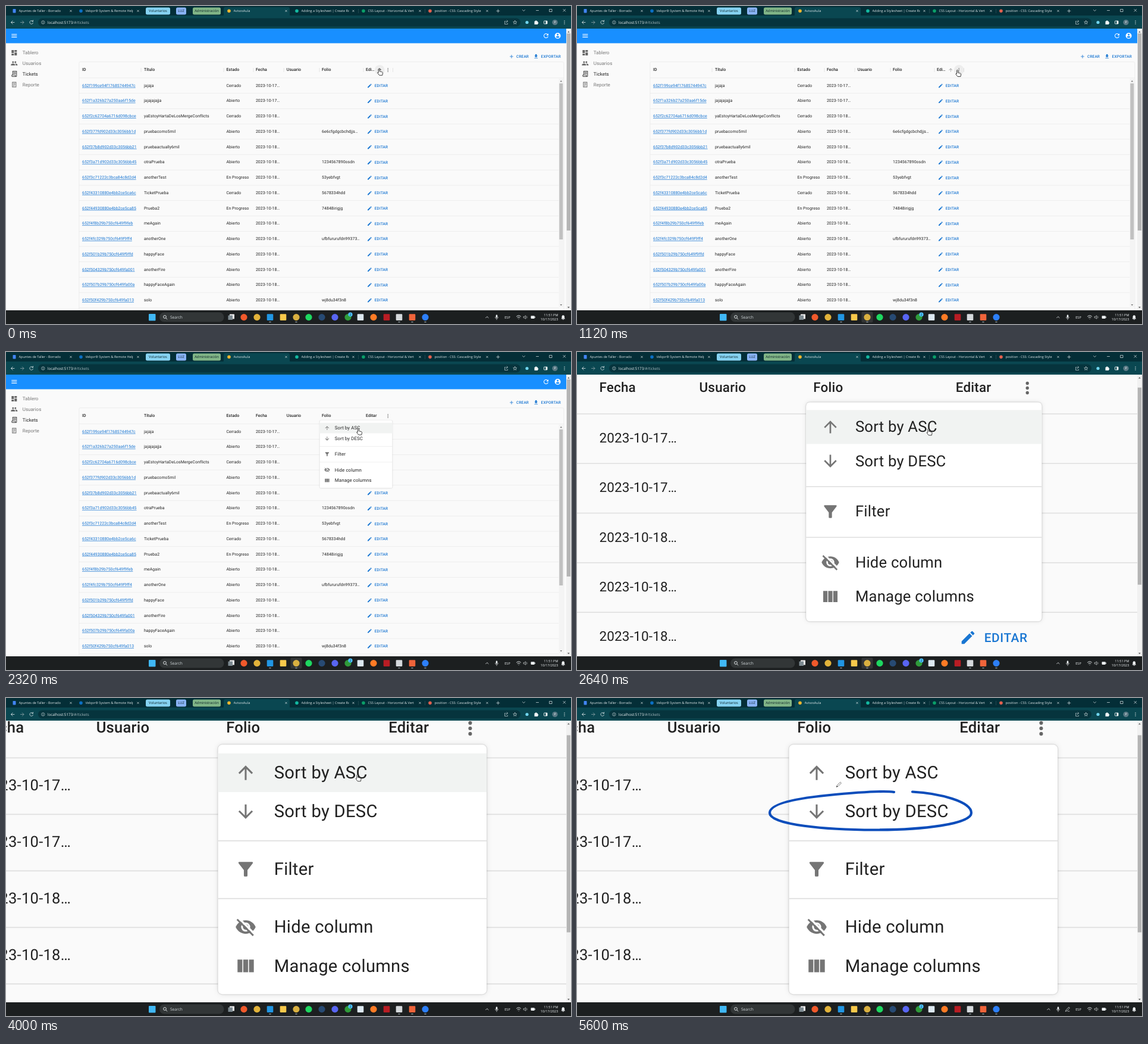
Animation, 950 px wide and 534 px high, one loop 5.68 s. Source, as an HTML page:

```html
<!DOCTYPE html>
<html lang="es">
<head>
<meta charset="utf-8">
<title>Tickets</title>
<style>
  html, body { margin: 0; width: 100%; height: 100%; overflow: hidden; background: #fafafa; }
  svg { display: block; }
  #stage { position: absolute; left: 0; top: 0; }
  text { text-rendering: geometricPrecision; white-space: pre; }
  .app { font-family: Roboto, Arial, sans-serif; }
  .ui { font-family: "Open Sans", "Noto Sans", sans-serif; }
  #menu .paper { filter: drop-shadow(0 .5px .35px rgba(0,0,0,.26)) drop-shadow(0 .5px 1.2px rgba(0,0,0,.1)); }
</style>
</head>
<body>
<svg id="stage" width="950" height="534" viewBox="0 0 950 534"></svg>
<script>
const LOOP = 5680;
const BLUE = '#1976d2', INK = '#212121', GREY = '#757575', LINE = '#e0e0e0';

const ICON = {
  menu: 'M3 18h18v-2H3zm0-5h18v-2H3zm0-7v2h18V6z',
  refresh: 'M17.65 6.35C16.2 4.9 14.21 4 12 4c-4.42 0-8 3.58-8 8s3.58 8 8 8c3.73 0 6.84-2.55 7.73-6h-2.08c-.82 2.33-3.04 4-5.65 4-3.31 0-6-2.69-6-6s2.69-6 6-6c1.66 0 3.14.69 4.22 1.78L13 11h7V4z',
  account: 'M12 2a10 10 0 1 0 0 20 10 10 0 0 0 0-20zm0 3a3 3 0 1 1 0 6 3 3 0 0 1 0-6zm0 14.2c-2.5 0-4.7-1.3-6-3.2 0-2 4-3.1 6-3.1s6 1.1 6 3.1c-1.3 1.9-3.5 3.2-6 3.2z',
  board: 'M3 13h8V3H3zm0 8h8v-6H3zm10 0h8V11h-8zm0-18v6h8V3z',
  people: 'M16 11a3 3 0 1 0 0-6 3 3 0 0 0 0 6zm-8 0a3 3 0 1 0 0-6 3 3 0 0 0 0 6zm0 2c-2.3 0-7 1.2-7 3.5V19h14v-2.5C15 14.2 10.3 13 8 13zm8 0-1 .1c1.2.8 2 1.9 2 3.4V19h6v-2.5c0-2.3-4.7-3.5-7-3.5z',
  receipt: 'M6 2v13H3v4c0 1.7 1.3 3 3 3h12c1.7 0 3-1.3 3-3V2zm2 2h11v15a1 1 0 0 1-2 0v-4H8zm1 2v2h9V6zm0 4v2h9v-2zM5 17h10v3H6a1 1 0 0 1-1-1z',
  report: 'M5 3h14v18H5zm2 2v14h10V5zm2 2h6v2H9zm0 4h6v2H9zm0 4h4v2H9z',
  edit: 'M3 17.25V21h3.75L17.81 9.94l-3.75-3.75zM20.71 7.04a1 1 0 0 0 0-1.41l-2.34-2.34a1 1 0 0 0-1.41 0l-1.83 1.83 3.75 3.75z',
  plus: 'M19 13h-6v6h-2v-6H5v-2h6V5h2v6h6z',
  save: 'M5 20h14v-2H5zM19 9h-4V3H9v6H5l7 7z',
  up: 'M4 12l1.41 1.41L11 7.83V20h2V7.83l5.58 5.59L20 12l-8-8z',
  down: 'M20 12l-1.41-1.41L13 16.17V4h-2v12.17l-5.58-5.59L4 12l8 8z',
  filter: 'M4.25 5.61 10 13v6q0 1 1 1h2q1 0 1-1v-6l5.74-7.39Q20.5 4 18.95 4H5.04Q3.5 4 4.25 5.61z',
  columns: 'M14.67 5v14H9.33V5zm1 14H21V5h-5.33zm-7.34 0V5H3v14z',
  dots: [6, 12, 18].map(y => `M10 ${y}a2 2 0 1 0 4 0 2 2 0 1 0-4 0z`).join('')
};

const text = (x, y, size, str, fill = INK, extra = '') =>
  `<text x="${x}" y="${y + size * .355}" font-size="${size}" fill="${fill}" ${extra}>${str.replace(/&/g, '&amp;')}</text>`;
const rect = (x, y, w, h, fill, r = 0, extra = '') =>
  `<rect x="${x}" y="${y}" width="${w}" height="${h}" rx="${r}" fill="${fill}" ${extra}/>`;
const dot = (x, y, r, fill, extra = '') => `<circle cx="${x}" cy="${y}" r="${r}" fill="${fill}" ${extra}/>`;
const at = (x, y, size, body) =>
  `<g transform="translate(${x - size / 2} ${y - size / 2}) scale(${size / 24})">${body}</g>`;
const icon = (name, x, y, size, fill) => at(x, y, size, `<path d="${ICON[name]}" fill="${fill}"/>`);
const stroke = (d, color, w = .8) =>
  `<path d="${d}" fill="none" stroke="${color}" stroke-width="${w}" stroke-linecap="round" stroke-linejoin="round"/>`;
const cross = (x, y, r, color) => stroke(`M${x - r} ${y - r}l${2 * r} ${2 * r}m0 ${-2 * r}l${-2 * r} ${2 * r}`, color, .7);

// Table
const COLS = [128, 231.9, 370.4, 419.9, 471.8, 531, 605];
const HEADS = ['ID', 'Título', 'Estado', 'Fecha', 'Usuario', 'Folio'];
const ROW = 25.73, TOP = 120.9;
const ROWS = `652f199ce94f17685744947c jajaja C
652f1a326b27a250aa6f15de jajajajajja A
652f2c62704a6716d098cbce yaEstoyHartaDeLosMergeConflicts C
652f377fd902d33c3056bb1d pruebacomo5mil A 6e6cfgdgcbchdjjs…
652f37b8d902d33c3056bb21 pruebaactually6mil A
652f3a71d902d33c3056bb45 otraPrueba A 1234567890osdn
652f3c71222c3bca84c8d2d4 anotherTest P 53yebfvgt
652f43310880e4bb2ce5ca6c TicketPrueba C 5678334hdd
652f44930880e4bb2ce5ca85 Prueba2 P 74848irigjg
652f4f8b29b750cf649f9feb meAgain A
652f4fc329b750cf649f9ff4 anotherOne A ufbfururufdn99373…
652f501b29b750cf649f9ffd happyFace A
652f504329b750cf649fa001 anotherFire A
652f507b29b750cf649fa00a happyFaceAgain A
652f50f429b750cf649fa013 solo A wj8du34f3n8`.split('\n').map(r => r.split(' '));
const STATE = { A: 'Abierto', C: 'Cerrado', P: 'En Progreso' };
const GAP = 'letter-spacing=".07"', BOLD = 'font-weight="500" letter-spacing=".07"', BTN = 'font-weight="500" letter-spacing=".18"';

function tableRow([id, title, state, folio = ''], i) {
  const y = 133.3 + i * ROW;
  const cells = [id, title, STATE[state], i < 2 ? '2023-10-17…' : '2023-10-18…', '', folio];
  return cells.map((c, k) => c && text(COLS[k], y, 6.93, c, k ? INK : BLUE, k ? GAP : 'text-decoration="underline"')).join('') +
    icon('edit', 611.4, y + .7, 8.9, BLUE) + text(619.8, y + .6, 6.44, 'EDITAR', BLUE, BTN) +
    rect(123, TOP + (i + 1) * ROW - .25, 806.5, .5, LINE);
}

function page() {
  const nav = [['board', 'Tablero', 78.4], ['people', 'Usuarios', 96.3], ['receipt', 'Tickets', 114.1], ['report', 'Reporte', 132]];
  const seps = [227, 366, 416, 467, 527, 601, 650.5];
  return rect(-10, 30, 960, 490, '#fafafa') +
    rect(0, 37, 942, 25.5, '#188fff') +
    icon('menu', 13.8, 50, 12, '#fff') + icon('refresh', 908, 50, 12, '#fff') + icon('account', 927.6, 50, 12, '#fff') +
    nav.map(([ic, label, y]) => {
      const on = label === 'Tickets';
      return icon(ic, 13.8, y, 12, on ? '#444' : '#666') + text(27.7, y, 7.92, label, on ? INK : '#757575', GAP);
    }).join('') +
    icon('plus', 850, 84.8, 9.9, BLUE) + text(858, 85, 6.44, 'CREAR', BLUE, BTN) +
    icon('save', 891.2, 84.8, 9.9, BLUE) + text(899.6, 85, 6.44, 'EXPORTAR', BLUE, BTN) +
    rect(122.8, 93.8, 815, 425, 'none', 2, `stroke="${LINE}" stroke-width=".5"`) +
    HEADS.map((h, i) => text(COLS[i], 107, 6.93, h, INK, BOLD)).join('') +
    rect(123, TOP - .25, 815, .5, LINE) +
    ROWS.map(tableRow).join('') +
    rect(929.5, 122, 8, 384, '#f4f4f4') + rect(930.3, 130, 6, 262, '#c1c1c1') +
    '<path d="M931.5 127.3l1.8-2.3 1.8 2.3zM931.5 501l1.8 2.3 1.8-2.3z" fill="#777"/>' +
    `<g id="hover">${seps.map(x => rect(x - .25, 104, .5, 7, '#cfcfcf')).join('')}
      <circle id="halo" cy="107.5" r="8.4" fill="#000" opacity=".05"/>
      ${text(COLS[6], 107, 6.93, 'Edi…', INK, BOLD)}
      <g id="sort">${icon('up', 628.3, 107.5, 8.9, '#333')}</g></g>
    <g id="calm">${text(COLS[6], 107, 6.93, 'Editar', INK, BOLD)}</g>` +
    icon('dots', 642.2, 107.5, 9.9, '#666') +
    `<g id="menu">${popup()}</g>`;
}

function popup() {
  const items = [['up', 'Sort by ASC', 127.5], ['down', 'Sort by DESC', 145.2], ['filter', 'Filter', 171.4], ['', 'Hide column', 197.7], ['columns', 'Manage columns', 215.4]];
  const eye = `<path d="M1 12c1.7-4.4 6-7.5 11-7.5s9.3 3.1 11 7.5c-1.7 4.4-6 7.5-11 7.5S2.7 16.4 1 12z" fill="${GREY}"/>` +
    dot(12, 12, 5, '#fff') + dot(12, 12, 3, GREY) +
    `<path d="M4 1.8L22 19.8" stroke="#fff" stroke-width="2.2"/><path d="M2.6 3.6L20.4 21.4" stroke="${GREY}" stroke-width="1.9"/>`;
  return rect(527.3, 114.9, 122.4, 113.6, '#fff', 2, 'class="paper"') +
    rect(527.3, 118.9, 122.4, 17.6, '#f1f3f2', 0, 'id="item"') +
    [158.4, 184.7].map(y => rect(527.3, y, 122.4, .5, LINE)).join('') +
    items.map(([ic, label, y]) =>
      (ic ? icon(ic, 539.9, y + .2, 9.9, GREY) : at(539.9, y + .2, 9.9, eye)) +
      text(552.85, y, 7.92, label, INK, 'letter-spacing=".074"')).join('');
}

// Browser frame
function browser() {
  const pale = '#dfe8ea', dim = '#8fa5aa';
  const tabs = [
    [14, 'Apuntes de Taller - Borrado', '#4285f4', 109], [126, 'Velqor® System & Remote Help', '#0b6fc4', 222],
    [375, 'AvisosAula', '#f2b72e', 471], [489, 'Adding a Stylesheet | Create Re', '#13b8a0', 584],
    [601, 'CSS Layout - Horizontal & Vert', '#0a9e68', 696], [713, 'position - CSS: Cascading Style', '#e0604f', 809]];
  const pills = [[235, 41, 'Voluntarios', '#86d3f2'], [286, 17, 'LUZ', '#8ab4f8'], [314, 47, 'Administración', '#81b587']];
  return rect(0, 0, 950, 17, '#042e37') + rect(0, 16, 950, 22, '#0a4751') +
    '<path d="M363 17q3 0 3-3V5q0-3 3-3h105q3 0 3 3v9q0 3 3 3z" fill="#0a4751"/>' +
    tabs.map(([x, name, color, end]) =>
      (x === 14 ? rect(11.5, 5, 5, 6.5, color, .8) : dot(x, 8.2, 2.8, color)) +
      `<svg x="${x + 7.5}" y="0" width="80" height="17">${text(0, 8.3, 5.55, name, pale)}</svg>` + cross(end, 8.3, 1.3, pale)).join('') +
    pills.map(([x, w, name, color]) => rect(x, 2.5, w, 12, color, 2.5) + text(x + w / 2, 8.4, 5.8, name, '#0b2328', 'text-anchor="middle"')).join('') +
    [592.5, 704.5].map(x => rect(x, 5, .5, 7, '#416068')).join('') +
    stroke('M824.8 8.3h5M827.3 5.8v5M868.5 6.5l2 2 2-2M891.5 7.5h4M914 5.5h4v4h-4z', pale, .7) + cross(938.8, 7.3, 1.9, pale) +
    stroke('M14 27.5h-5.5m2.6-2.6l-2.6 2.6 2.6 2.6', pale) + stroke('M24.5 27.5h5.5m-2.6-2.6l2.6 2.6-2.6 2.6', dim) +
    stroke('M45 25.5a2.9 2.9 0 1 0 .5 3M45.5 24v2h-2', pale) +
    rect(54, 20.5, 811, 14, '#06343d', 7) +
    dot(62.3, 27.5, 2.7, 'none', `stroke="${pale}" stroke-width=".6"`) + stroke('M62.3 27.3v1.5M62.3 26v.1', pale, .6) +
    text(69.8, 27.4, 6.3, `localhost:5173<tspan fill="#a9bcc0">/#/tickets</tspan>`, '#f2f6f7') +
    stroke('M840 25.5h-1.5v5h5v-1.5M840.5 28q.5-2.5 3-2.5m-1.5-1.5l1.7 1.5-1.7 1.5', pale, .6) +
    stroke('M855.8 24.5l.9 2 2.2.2-1.7 1.4.5 2.2-1.9-1.2-1.9 1.2.5-2.2-1.7-1.4 2.2-.2z', pale, .6) +
    dot(876, 27.5, 2.6, '#6fd5ee') +
    '<path d="M888.5 25.5h1.5a1.2 1.2 0 0 1 2.4 0h1.7v1.7a1.2 1.2 0 0 1 0 2.4v1.4h-5.6z" fill="#f2f6f7"/>' +
    rect(904.5, 25, 5.5, 5, 'none', .5, 'stroke="#fff" stroke-width=".8"') + rect(907.5, 25, 2.5, 5, '#fff') +
    dot(923, 27.5, 4.6, '#5b7a86') + text(923, 27.5, 5, 'P', '#fff', 'text-anchor="middle"') +
    [25, 27.5, 30].map(y => dot(939, y, .7, pale)).join('');
}

function taskbar() {
  const apps = [[400, '#f0592b'], [422, '#e2b33a'], [444, '#2196e3', 1], [466, '#f7c94b', 1], [488, '#d9b040'], [509, '#1ed760'],
    [531, '#274a73'], [553, '#5865f2'], [575, '#2f9b3a'], [596, '#dce8f0', 1], [618, '#ff7b25'], [640, '#b81d24', 1],
    [661, '#d5d9dc', 1], [683, '#f0643a', 1], [705, '#2d7ff9']];
  const w = '#eef2f4';
  return rect(0, 511, 950, 23, '#1c1f20') +
    rect(240, 517, 11.5, 11.5, '#40b8f5', 1) +
    rect(258, 514.5, 108.5, 16, '#323637', 8) +
    dot(267, 522, 2.4, 'none', `stroke="${w}" stroke-width=".9"`) + stroke('M268.9 524l2 2', w, .9) +
    text(276, 522.5, 6.6, 'Search', '#d2d9dc') +
    rect(376, 517.5, 8, 8, '#eee', .6) + rect(373.5, 519.5, 7.5, 7.5, '#7d8a91', .6) +
    rect(478.5, 513.5, 19, 18, '#fff', 2, 'id="glow" opacity=".1"') +
    apps.map(([x, c, sq]) => sq ? rect(x - 5.3, 517.3, 10.6, 10.6, c, 1.2) : dot(x, 522.6, 5.6, c)).join('') +
    dot(579, 518, 3.6, '#4cc2ff') + text(579, 518, 5, '2', '#06202b', 'text-anchor="middle"') +
    [444, 488, 661, 683, 705].map(x => rect(x - 1.8, 530, 3.6, 1.2, '#9aa7ad', .6)).join('') +
    `<g id="tray">${stroke('M806.7 523.7l2.2-2.2 2.2 2.2', w)}${rect(823.7, 518.5, 2.6, 5, w, 1.3)}${stroke('M822.5 522.5q0 2.5 2.5 2.5t2.5-2.5M825 525v1.8', w, .6)}</g>` +
    `<g id="tool">${stroke('M821.5 526l1-2.5 4.5-4.5 1.5 1.5-4.5 4.5zM825 526h3', w, .7)}</g>` +
    text(843, 522.6, 5.6, 'ESP', w, 'text-anchor="middle"') +
    stroke('M858.5 521.3q3.5-3.3 7 0M860 523.2q2-1.8 4 0M862 525.3v.1', w, .9) +
    stroke('M870.5 521.5h1.3l1.8-1.7v5.6l-1.8-1.7h-1.3zM875.5 521q1.3 1.6 0 3.2', w, .6) +
    rect(882.5, 520.3, 6.2, 4.6, w, .8) + rect(889, 521.5, .9, 2.2, w) +
    text(928.5, 518.8, 5.6, '11:51 PM', w, 'text-anchor="end"') + text(928.5, 526.2, 5.6, '10/17/2023', w, 'text-anchor="end"') +
    '<path d="M933.5 525.5l1-1.5v-2.5q.3-2.3 2.3-2.3t2.3 2.3v2.5l1 1.5zm2 .6h2.6q-1.3 1.8-2.6 0z" fill="#eef2f4"/>';
}

const RING = 'M533 158C515 155 470 158.500 420 163.500C365 169 324 178 324 193C324 213 420 221.500 500 221.500C580 221.500 663 212 663 193C663 174 610 160 564 157.500';

document.getElementById('stage').innerHTML =
  `<g class="app"><svg x="0" y="38" width="942" height="473" viewBox="0 38 942 473"><g id="page">${page()}</g></svg></g>` +
  rect(942, 38, 8, 473, '#f1f1f1') + rect(942.8, 46, 6.2, 331, '#b4b4b4', 0, 'id="thumb"') +
  '<path d="M944 44.5l1.9-2.4 1.9 2.4zM944 505l1.9 2.4 1.9-2.4z" fill="#666"/>' +
  `<g class="ui">${browser()}${taskbar()}</g>
  <path id="ring" d="${RING}" pathLength="1" fill="none" stroke="#0b4dbb" stroke-width="4.2" stroke-linecap="round"/>
  <path id="hand" d="M-1 1q1-1.6 2 0v4l4 1q1.4.6 1.2 2l-.7 3.5h-5l-3.2-4.2q.2-1.4 1.7-.3z" fill="#fff" stroke="#111" stroke-width=".8" stroke-linejoin="round"/>
  <g id="pen"><path d="M0 0l1-2.8L6.4-8.3l1.7 1.6L2.7-1.2z" fill="#fff" stroke="#444" stroke-width=".7"/><path d="M0 0l.7-2 1.3 1.3z" fill="#111"/></g>`;

const el = {};
document.querySelectorAll('#stage [id]').forEach(n => el[n.id] = n);
const show = (name, on) => { el[name].style.display = on ? '' : 'none'; };
const ringLength = el.ring.getTotalLength();

// Value at time t from [time, ...values] steps
function track(steps, t, ease = k => k) {
  let i = 0;
  while (i < steps.length - 1 && steps[i + 1][0] <= t) i++;
  const a = steps[i], b = steps[i + 1] || a;
  const k = t <= a[0] || a === b ? 0 : ease((t - a[0]) / (b[0] - a[0]));
  return a.slice(1).map((v, n) => v + (b[n + 1] - v) * k);
}
const smooth = k => k * k * (3 - 2 * k);

const ZOOM = [[2340, 1], [2400, 1.2], [2480, 1.85], [2560, 2.6], [2640, 3.234], [2720, 3.55], [2800, 3.69]];
const HAND = [[0, 627.3, 104.8], [320, 627.3, 104.8], [640, 639.5, 107], [2160, 639.5, 107], [2340, 590.8, 128.3]];
const PEN = [[4160, 590, 130], [4440, 533, 158]];
const LEAVE = [[5240, 564, 157.5], [5480, 436.3, 149.5]];
const CX = 590.8, CY = 128.5, OPEN = 2180, PEN_ON = 4160, DRAW = 4480, DONE = 5200;

function render(t) {
  const [s] = track(ZOOM, t);
  el.page.setAttribute('transform', `translate(${CX} ${CY}) scale(${s}) translate(${-CX} ${-CY})`);
  el.thumb.setAttribute('y', 46 + 16.5 * (s - 1) / 2.69);

  const open = t >= OPEN, inking = t >= PEN_ON, onDots = t >= 500;
  show('menu', open);
  show('calm', open);
  show('hover', !open);
  show('item', !inking);
  show('glow', t >= 640 && t < 3360);
  el.halo.setAttribute('cx', onDots ? 642.2 : 628.3);
  el.sort.style.opacity = onDots ? .45 : 1;

  show('hand', !inking);
  show('pen', inking);
  show('tool', inking);
  el.tray.setAttribute('transform', `translate(${inking ? -16 : 0} 0)`);

  const [hx, hy] = track(HAND, t, smooth);
  el.hand.setAttribute('transform', `translate(${hx} ${hy})`);

  const p = smooth(Math.min(1, Math.max(0, (t - DRAW) / (DONE - DRAW))));
  show('ring', p > 0);
  el.ring.setAttribute('stroke-dasharray', p < 1 ? `${p} 2` : 'none');
  let [px, py] = track(t < DRAW ? PEN : LEAVE, t, smooth);
  if (t >= DRAW && t < DONE) ({ x: px, y: py } = el.ring.getPointAtLength(p * ringLength));
  el.pen.setAttribute('transform', `translate(${px} ${py})`);
}

const start = performance.now();
(function tick() {
  render((performance.now() - start) % LOOP);
  requestAnimationFrame(tick);
})();
</script>
</body>
</html>
```
